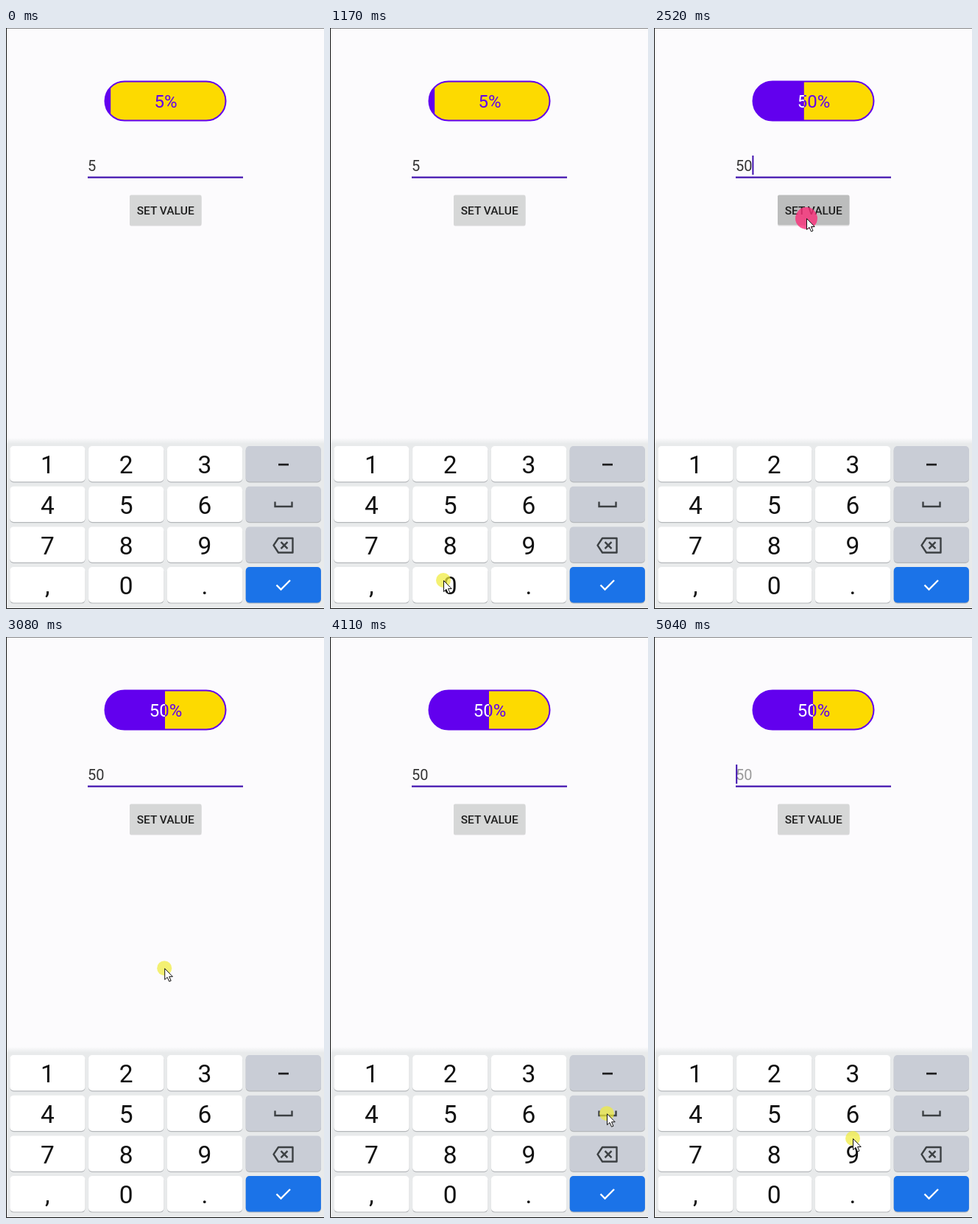
An HTML page that plays this animation: 432 px wide and 788 px high, repeating every 5080 ms.

```html
<!DOCTYPE html>
<html lang="en">
<head>
<meta charset="utf-8">
<title>Progress button demo</title>
<style>
  html, body { margin: 0; width: 100%; height: 100%; overflow: hidden; background: #fcfbfd; }
  svg { display: block; width: 432px; height: 788px; font-family: Roboto, "Open Sans", sans-serif; }
  .mid { text-anchor: middle; }
  .line { fill: none; stroke-linejoin: miter; }
</style>
</head>
<body>
<svg viewBox="0 0 432 788">
  <defs>
    <linearGradient id="edge" x2="0" y2="1">
      <stop offset="0" stop-color="#fcfbfd"/>
      <stop offset="1" stop-color="#e8eaeb"/>
    </linearGradient>
    <clipPath id="done"><rect id="fillClip" x="133" y="70" width="9" height="58"/></clipPath>
    <g id="pillText" class="mid" font-size="24"><text class="percent" x="217" y="108.3"></text></g>
  </defs>
  <rect width="432" height="788" fill="#fcfbfd"/>

  <rect x="134.5" y="72.5" width="164" height="53" rx="26.5" fill="#fdda00"/>
  <use href="#pillText" fill="#6200ee"/>
  <g clip-path="url(#done)">
    <rect x="134.5" y="72.5" width="164" height="53" rx="26.5" fill="#6200ee"/>
    <use href="#pillText" fill="#fff"/>
  </g>
  <rect x="134.5" y="72.5" width="164" height="53" rx="26.5" class="line" stroke="#6200ee" stroke-width="2"/>

  <text id="field" x="111" y="194" font-size="20"></text>
  <rect x="111" y="201.5" width="211" height="2.2" fill="#3f0fae"/>
  <rect id="caret" y="173" width="2" height="26" fill="#3f0fae"/>

  <rect x="168" y="228" width="97.5" height="40.5" rx="2" fill="#000" opacity=".14"/>
  <rect id="button" x="168" y="226.5" width="97.5" height="40.5" rx="2"/>
  <text x="216.7" y="252.7" class="mid" font-size="15.5" font-weight="500" fill="#1f1f1f">SET VALUE</text>

  <rect y="558" width="432" height="230" fill="#e8eaeb"/>
  <rect y="556" width="432" height="8" fill="url(#edge)"/>
  <g id="keys"></g>
  <g class="line" stroke="#3c4043" stroke-width="2.4">
    <path d="M365.5 642.5V649H388.500V642.5"/>
    <path d="M370 692H389.500V711.500H370L363.500 701.700Z" stroke-linejoin="round"/>
    <path d="M373.500 697.200L382.500 706.200M382.500 697.200L373.500 706.200"/>
    <path d="M367.500 755.500L373.500 761.500L386 749" stroke="#fff"/>
  </g>
  <rect x="370" y="590.8" width="14" height="2.7" fill="#1d1d1f"/>

  <path d="M0 .5H432" stroke="#88888a"/>
  <path d="M.5 0V787.500H432" class="line" stroke="#111"/>

  <g id="pointer">
    <circle id="halo"/>
    <path d="M.5 .5V15.500L4 12.300L6.500 18L9 17L6.500 11.500H11.200Z" fill="#fff" stroke="#111"/>
  </g>
</svg>
<script>
const LOOP = 5080;
const $ = id => document.getElementById(id);
const set = (el, attrs) => Object.entries(attrs).forEach(([k, v]) => el.setAttribute(k, v));

function add(parent, tag, attrs, text = '') {
  const el = document.createElementNS('http://www.w3.org/2000/svg', tag);
  set(el, attrs);
  el.textContent = text;
  return parent.appendChild(el);
}

// Keypad: blank entries are the icon keys in the right column
const faces = ['123 ', '456 ', '789 ', ',0. '].join('').split('').map((label, i) => {
  const col = i % 4, row = i >> 2;
  const x = 5.3 + col * 106.8, y = 567 + row * 54.7;
  const color = i === 15 ? '#1b73e8' : col === 3 ? '#c9cdd6' : '#fff';
  const box = { x, width: 102.2, height: 48.3, rx: 5 };
  add($('keys'), 'rect', { ...box, y: y + 1.2, fill: '#b4b7ba' });
  const face = add($('keys'), 'rect', { ...box, y, fill: color });
  add($('keys'), 'text', { x: x + 51, y: y + 37.2, class: 'mid', 'font-size': 33.5, fill: '#111' }, label);
  return { face, color };
});

// Pointer path: time, x, y
const path = [
  [190, 259, 700], [460, 222, 728], [700, 200, 740], [1000, 160, 748], [1170, 154, 749],
  [1450, 157, 750], [1640, 220, 500], [1820, 208, 293], [1960, 203, 268], [2200, 207, 258],
  [2800, 207, 258], [3060, 218, 430], [3360, 178, 704], [3550, 175, 743], [3640, 190, 742],
  [3920, 373, 652], [4110, 376, 646], [4270, 375, 685], [4400, 376, 702],
  [4830, 376, 702], [5040, 270, 680]
];

function pointAt(t) {
  const i = path.findIndex(p => p[0] > t);
  if (i < 0) return path[path.length - 1].slice(1);
  const [t0, x0, y0] = path[i - 1], [t1, x1, y1] = path[i];
  const u = (t - t0) / (t1 - t0);
  return [x0 + (x1 - x0) * u, y0 + (y1 - y0) * u];
}

const within = (t, a, b) => t >= a && t < b;

function paintKey(i, pressed, shade) {
  set(faces[i].face, { fill: pressed ? shade : faces[i].color });
}

function draw(t) {
  const typed = t < 1350 ? '5' : t < 4670 ? '50' : t < 4760 ? '5' : '';
  set($('field'), { fill: typed ? '#333' : '#999' });
  $('field').textContent = typed || '50';

  // The caret blinks each half second and restarts on every edit
  const edit = t < 1350 ? 350 : t < 4670 ? 1350 : 4670;
  const caretOn = t >= edit && (t - edit) % 1000 < 500;
  set($('caret'), { x: 111.2 + typed.length * 11.1, opacity: +caretOn });

  const u = Math.min(1, Math.max(0, (t - 2340) / 305));
  const value = 5 + 45 * (1 - (1 - u) ** 2);
  set($('fillClip'), { width: 1 + value * 1.64 });
  document.querySelector('.percent').textContent = t < 2340 ? '5%' : '50%';

  const onButton = within(t, 2300, 2660);
  const onZero = within(t, 1310, 1430);
  const onDelete = within(t, 4430, 4790);
  set($('button'), { fill: onButton ? '#bcbdbd' : '#d6d7d7' });
  paintKey(13, onZero, '#dadce0');
  paintKey(11, onDelete, '#b2b7c1');

  const down = onZero || onDelete || within(t, 2300, 2600);
  set($('halo'), {
    r: down ? 15 : 10,
    fill: down ? '#fa2d78' : '#f0ec3c',
    opacity: down ? .8 : .72
  });
  const shown = t >= path[0][0];
  set($('pointer'), { visibility: shown ? 'visible' : 'hidden' });
  if (shown) set($('pointer'), { transform: `translate(${pointAt(t)})` });
}

const start = performance.now();
function tick() {
  draw((performance.now() - start) % LOOP);
  requestAnimationFrame(tick);
}
tick();
</script>
</body>
</html>
```
